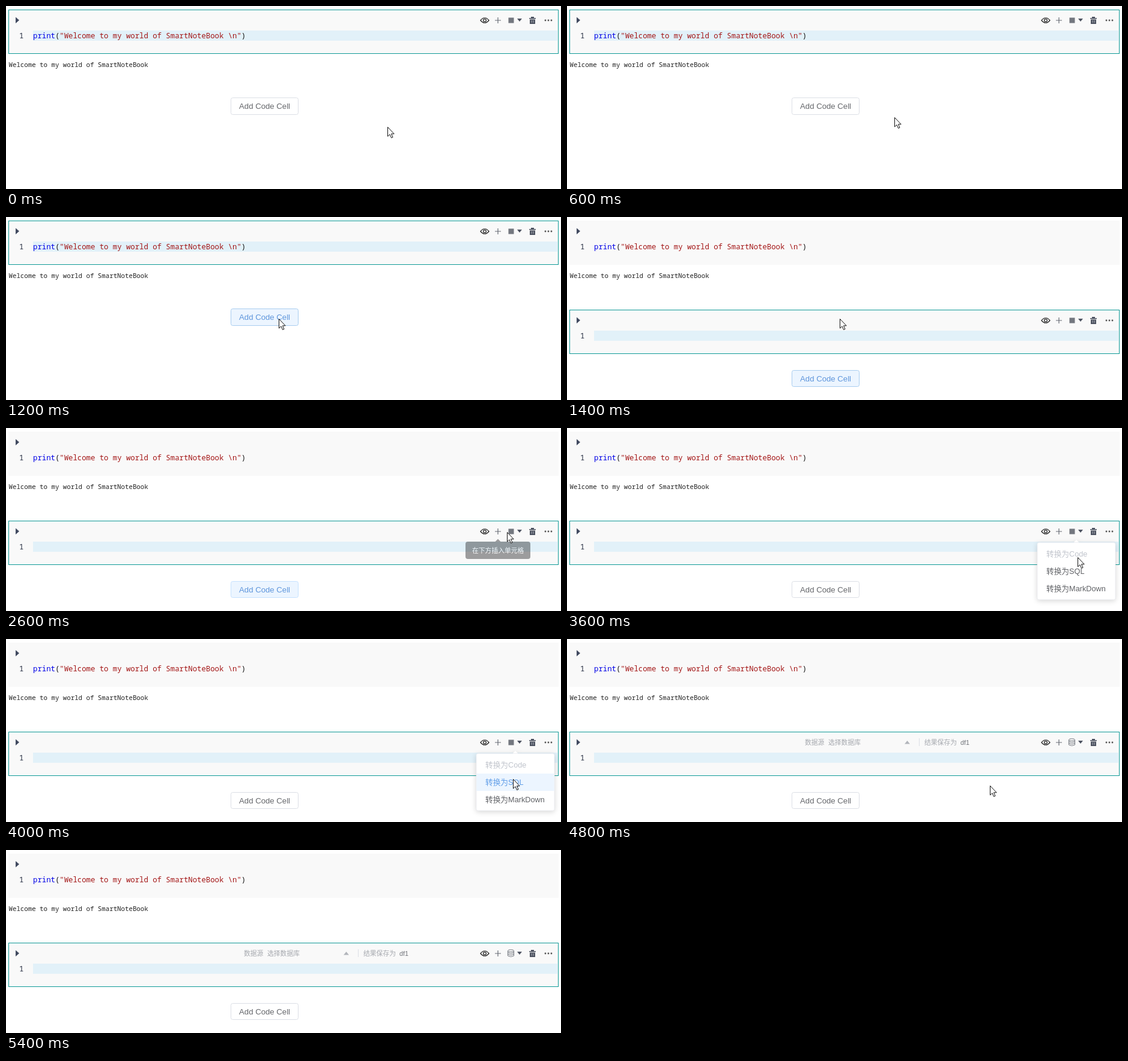
An HTML page for the animation above (6.2 s loop, 924x306 px).

```html
<!DOCTYPE html>
<html lang="en">
<head>
<meta charset="utf-8">
<title>Notebook cells</title>
<style>
  html, body { margin: 0; width: 100%; height: 100%; overflow: hidden; background: #fff; }
  svg { display: block; width: 924px; height: 306px; }
  text { font-family: 'Liberation Sans', 'Noto Sans CJK SC', 'Noto Sans CJK', sans-serif; white-space: pre; }
  .code, .output { font-family: 'Noto Sans Mono', 'DejaVu Sans Mono', monospace; }
  .code { font-size: 12.3px; }
  .output { font-size: 10.75px; fill: #222; }
  .button { font-size: 13.2px; }
  .small { font-size: 10.8px; }
  .menu { font-size: 12.7px; fill: #606266; }
  .shadow { filter: drop-shadow(0 2px 4px rgba(0, 0, 0, .16)); }
</style>
</head>
<body>
<svg viewBox="0 0 924 306">
  <defs>
    <g id="tools">
      <path d="M790 24Q797 15.5 804 24Q797 32.5 790 24Z" fill="none" stroke="#222" stroke-width="1.2"/>
      <circle cx="797" cy="24" r="2.4" fill="none" stroke="#222" stroke-width="1.2"/>
      <path d="M814 24H824M819 19V29" stroke="#666b75" stroke-width="1.2"/>
      <path d="M851 21H859L855 26Z" fill="#4d5361"/>
      <path d="M871 20H874V18H879V20H882V21.5H871ZM872 22.5H881V30H872Z" fill="#4d5361"/>
      <path d="M875 24V28M878 24V28" stroke="#aeb2ba"/>
      <g fill="#555"><circle cx="898" cy="24" r="1.4"/><circle cx="903" cy="24" r="1.4"/><circle cx="908" cy="24" r="1.4"/></g>
    </g>
    <g id="gutter">
      <path d="M16 18.5V29L22 23.8Z" fill="#414a60"/>
      <text class="code" x="22" y="54" fill="#20283c">1</text>
    </g>
  </defs>

  <rect id="firstCell" x="4.5" y="6.5" width="915" height="73" fill="#f9f9f9"/>
  <rect id="firstLine" x="45" y="41" width="873" height="17" fill="#e2f1f9"/>
  <use href="#gutter"/>
  <g id="firstTools">
    <use href="#tools"/>
    <rect x="836.5" y="19.5" width="9" height="9" fill="#73777f"/>
  </g>
  <text class="code" x="45" y="54" fill="#111"><tspan fill="#0000e6">print</tspan>(<tspan fill="#a31515">"Welcome to my world of SmartNoteBook \n"</tspan>)</text>
  <text class="output" x="4.5" y="102">Welcome to my world of SmartNoteBook</text>

  <g id="secondCell">
    <g transform="translate(0 149)">
      <rect x="4.5" y="6.5" width="915" height="73" fill="#f9f9f9" stroke="#0e9a96"/>
      <rect x="45" y="41" width="873" height="17" fill="#e2f1f9"/>
      <use href="#gutter"/>
      <use href="#tools"/>
      <rect id="kind" x="836.5" y="19.5" width="9" height="9"/>
      <g id="database" fill="none" stroke="#73777f">
        <ellipse cx="840.5" cy="19.5" rx="5" ry="1.8"/>
        <path d="M835.5 19.5V28Q840.5 31 845.5 28V19.5M835.5 22.5Q840.5 25.5 845.5 22.5M835.5 25.3Q840.5 28.3 845.5 25.3"/>
      </g>
      <g id="query" class="small" fill="#a5a8ae">
        <text x="396" y="27.5">数据源</text>
        <text x="435" y="27.5">选择数据库</text>
        <path d="M562 26.5H571L566.5 21Z" fill="#b2b5bb"/>
        <path d="M586.5 17V30" stroke="#dcdfe6"/>
        <text x="595" y="27.5">结果保存为</text>
        <text x="655" y="27.5" fill="#707379">df1</text>
      </g>
    </g>
  </g>

  <g id="button">
    <rect id="buttonBox" x="374.5" y="153.5" width="112" height="28" rx="3"/>
    <text id="buttonText" class="button" x="388" y="171.5">Add Code Cell</text>
  </g>

  <g id="insertTip">
    <path d="M814 190.5L819 185.5L824 190.5Z" fill="#303133"/>
    <rect x="765" y="190" width="108" height="29" rx="4" fill="#303133"/>
    <text class="small" x="776" y="208.5" fill="#fff">在下方插入单元格</text>
  </g>

  <g id="menu">
    <g class="shadow">
      <path d="M843 192L848 187L853 192Z" fill="#fff"/>
      <rect x="783" y="191.5" width="130" height="95.5" rx="3" fill="#fff" stroke="#e8eaef" stroke-width=".7"/>
    </g>
    <rect id="menuHover" x="783.4" y="225" width="129.2" height="29" fill="#ecf5ff"/>
    <g class="menu">
      <text x="798" y="215" fill="#c0c4cc">转换为Code</text>
      <text id="sqlItem" x="798" y="244">转换为SQL</text>
      <text x="798" y="273">转换为MarkDown</text>
    </g>
  </g>

  <g id="convertTip">
    <rect x="799" y="126" width="97" height="29" rx="4" fill="#303133"/>
    <path d="M843 154.5L848 160L853 154.5Z" fill="#303133"/>
    <text class="small" x="810" y="144" fill="#fff">转换单元格类型</text>
  </g>

  <g id="pointer">
    <circle id="click" r="16" fill="#efe415"/>
    <path d="M.5 .5V16L4 12.7L6.6 18.5L9 17.4L6.5 11.8H11.2Z" fill="#fff" stroke="#111" stroke-linejoin="round"/>
  </g>
</svg>
<script>
const LOOP = 6200, STEP = 200;
const $ = id => document.getElementById(id);
const set = (id, attrs) => {
  for (const name in attrs) $(id).setAttribute(name, attrs[name]);
};
const show = (id, opacity) => {
  $(id).style.display = opacity ? '' : 'none';
  $(id).style.opacity = Number(opacity);
};

// Pointer stops: step, x, y
const stops = [
  [0, 635, 202], [6, 454, 170], [9, 454, 170], [12, 817, 173], [13, 834, 174],
  [14, 852, 180], [15, 862, 183], [20, 844, 234], [23, 844, 234], [26, 303, 276]
];

function pointerAt(step) {
  const next = stops.findIndex(stop => stop[0] > step);
  if (next < 0) return stops[stops.length - 1].slice(1);
  const [s0, x0, y0] = stops[next - 1], [s1, x1, y1] = stops[next];
  const p = (step - s0) / (s1 - s0), k = p * p * (3 - 2 * p);
  return [x0 + (x1 - x0) * k, y0 + (y1 - y0) * k].map(Math.round);
}

function render(time) {
  const step = Math.floor(time % LOOP / STEP);
  const [x, y] = pointerAt(step);
  const added = step >= 7, converted = step >= 23;

  set('firstCell', { stroke: added ? '#f9f9f9' : '#0e9a96' });
  show('firstLine', !added);
  show('firstTools', !added);
  show('secondCell', added);
  show('kind', !converted);
  show('database', converted);
  show('query', converted);
  set('kind', { fill: step === 15 || step === 16 ? '#409eff' : '#73777f' });

  const top = added ? 256 : 153;
  const over = step < 27 && x >= 374 && x <= 487 && y >= top && y <= top + 29;
  const focused = step >= 7 && step < 15;
  const active = over || focused;
  set('button', { transform: `translate(0 ${top - 153})` });
  set('buttonBox', {
    height: added ? 27 : 28,
    fill: active ? '#ecf5ff' : '#fff',
    stroke: !active ? '#dcdfe6' : step < 10 ? '#a9cdf0' : '#c6e2ff'
  });
  set('buttonText', { fill: active ? '#5f96dc' : '#66686c' });

  show('insertTip', { 12: 1, 13: .46 }[step] || 0);
  show('convertTip', { 14: 1, 15: 1, 16: 1, 17: .45 }[step] || 0);

  const onSql = y >= 225 && y < 254;
  show('menu', step < 15 || step > 23 ? 0 : { 15: .93, 23: .4 }[step] || 1);
  show('menuHover', onSql);
  set('sqlItem', { fill: onSql ? '#5f9de8' : '#606266' });

  show('pointer', step < 27);
  show('click', step === 15 || step === 22);
  set('pointer', { transform: `translate(${x} ${y})` });
}

const start = performance.now();
function tick() {
  render(performance.now() - start);
  requestAnimationFrame(tick);
}
tick();
</script>
</body>
</html>
```
